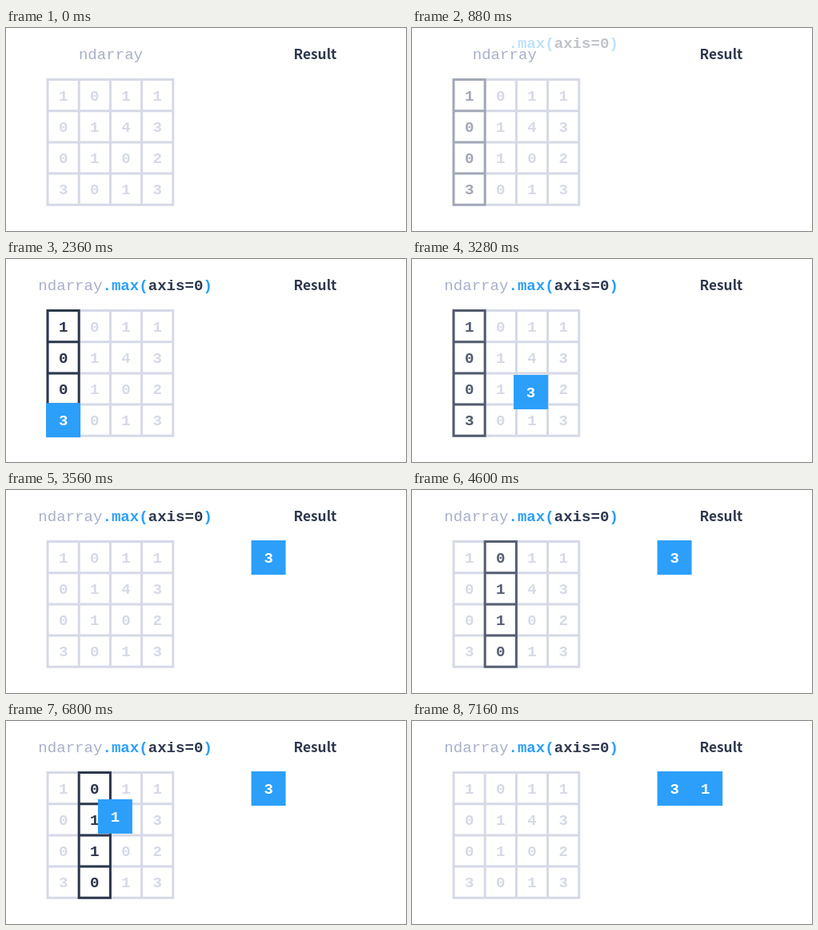
An HTML page with a canvas for the animation above (8000 ms loop, 500 px wide and 254 px high).

```html
<!DOCTYPE html>
<html lang="en">
<head>
<meta charset="utf-8">
<title>ndarray.max(axis=0)</title>
<style>
  html, body { margin: 0; width: 100%; height: 100%; overflow: hidden; background: #fff; }
  canvas { display: block; width: 500px; height: 254px; }
</style>
</head>
<body>
<canvas id="stage"></canvas>
<script>
const W = 500, H = 254, LOOP = 8000, STEP = 40;
const PALE = '#d6d9e6', MUTED = '#a9afca', DARK = '#2d374c', BLUE = '#2b9ffa';
const SANS = '"Noto Sans CJK JP", "Noto Sans CJK SC", "Noto Sans", sans-serif';
const MONO = '"Liberation Mono", "Noto Sans Mono", monospace';
const DATA = [[1, 0, 1, 1], [0, 1, 4, 3], [0, 1, 0, 2], [3, 0, 1, 3]];
const GRID = { x: 52, y: 64.5, cell: 39.2 };
const ADVANCE = 11.45, BASE = 38.5, BOX = 43;

const canvas = document.getElementById('stage');
const ctx = canvas.getContext('2d');
const ratio = window.devicePixelRatio || 1;
canvas.width = W * ratio;
canvas.height = H * ratio;

// Font size at which one monospace character is ADVANCE wide
ctx.font = '100px ' + MONO;
const monoSize = 100 * ADVANCE / ctx.measureText('0').width;
const regular = `${monoSize}px ${MONO}`;
const bold = `bold ${monoSize}px ${MONO}`;

const lerp = (a, b, p) => a + (b - a) * p;

function progress(t, start, steps = 10) {
  const p = (Math.floor((t - start) / STEP) + 1) / steps;
  return Math.max(0, Math.min(1, p));
}

// Fades out from one step after the start
const fadeOut = (t, start) => 1 - progress(t, start + STEP, 9);

function text(str, x, y, font, color, align = 'left') {
  ctx.font = font;
  ctx.fillStyle = color;
  ctx.textAlign = align;
  ctx.fillText(str, x, y);
}

function center(row, col) {
  return {
    x: GRID.x + (col + 0.5) * GRID.cell,
    y: GRID.y + (row + 0.5) * GRID.cell
  };
}

function digit(n, c, color) {
  text(n, c.x, c.y + 6.4, bold, color, 'center');
}

function cells(from, to, color, alpha = 1) {
  if (alpha <= 0) return;
  const { x, y, cell } = GRID;
  const left = x + from * cell, right = x + to * cell, bottom = y + 4 * cell;
  ctx.globalAlpha = alpha;
  ctx.strokeStyle = color;
  ctx.lineWidth = 3;
  ctx.beginPath();
  ctx.rect(left, y, right - left, 4 * cell);
  for (let r = 1; r < 4; r++) {
    ctx.moveTo(left, y + r * cell);
    ctx.lineTo(right, y + r * cell);
  }
  for (let c = from + 1; c < to; c++) {
    ctx.moveTo(x + c * cell, y);
    ctx.lineTo(x + c * cell, bottom);
  }
  ctx.stroke();
  for (let r = 0; r < 4; r++)
    for (let c = from; c < to; c++) digit(DATA[r][c], center(r, c), color);
  ctx.globalAlpha = 1;
}

function chip(row, col, target, shown, moved) {
  if (shown <= 0) return;
  const from = center(row, col);
  const c = { x: lerp(from.x, target, moved), y: lerp(from.y, 84.5, moved) };
  ctx.globalAlpha = shown;
  ctx.fillStyle = BLUE;
  ctx.fillRect(c.x - BOX / 2, c.y - BOX / 2, BOX, BOX);
  digit(DATA[row][col], c, '#fff');
  ctx.globalAlpha = 1;
}

function heading(p) {
  const x = lerp(90.9, 40.3, p);
  text('ndarray', x, BASE, regular, MUTED);
  if (p > 0) {
    const y = BASE - 19 * (1 - p);
    const at = i => 40.3 + i * ADVANCE;
    ctx.globalAlpha = p;
    text('.max(', at(7), y, bold, BLUE);
    text('axis=0', at(12), y, bold, DARK);
    text(')', at(18), y, bold, BLUE);
    ctx.globalAlpha = 1;
  }
  text('Result', 386.4, BASE, `bold 17.3px ${SANS}`, DARK, 'center');
}

function draw(t) {
  const call = progress(t, 800);

  ctx.setTransform(ratio, 0, 0, ratio, 0, 0);
  ctx.fillStyle = '#fff';
  ctx.fillRect(0, 0, W, H);

  heading(call);
  cells(0, 4, PALE);
  cells(0, 1, DARK, call * fadeOut(t, 3200));
  cells(1, 2, DARK, progress(t, 4400, 8) * fadeOut(t, 6800));
  chip(3, 0, 328.1, progress(t, 2000), progress(t, 3200));
  chip(1, 1, 366.7, progress(t, 5600), progress(t, 6800));
}

const begin = performance.now();
function tick() {
  draw((performance.now() - begin) % LOOP);
  requestAnimationFrame(tick);
}
tick();
</script>
</body>
</html>
```
